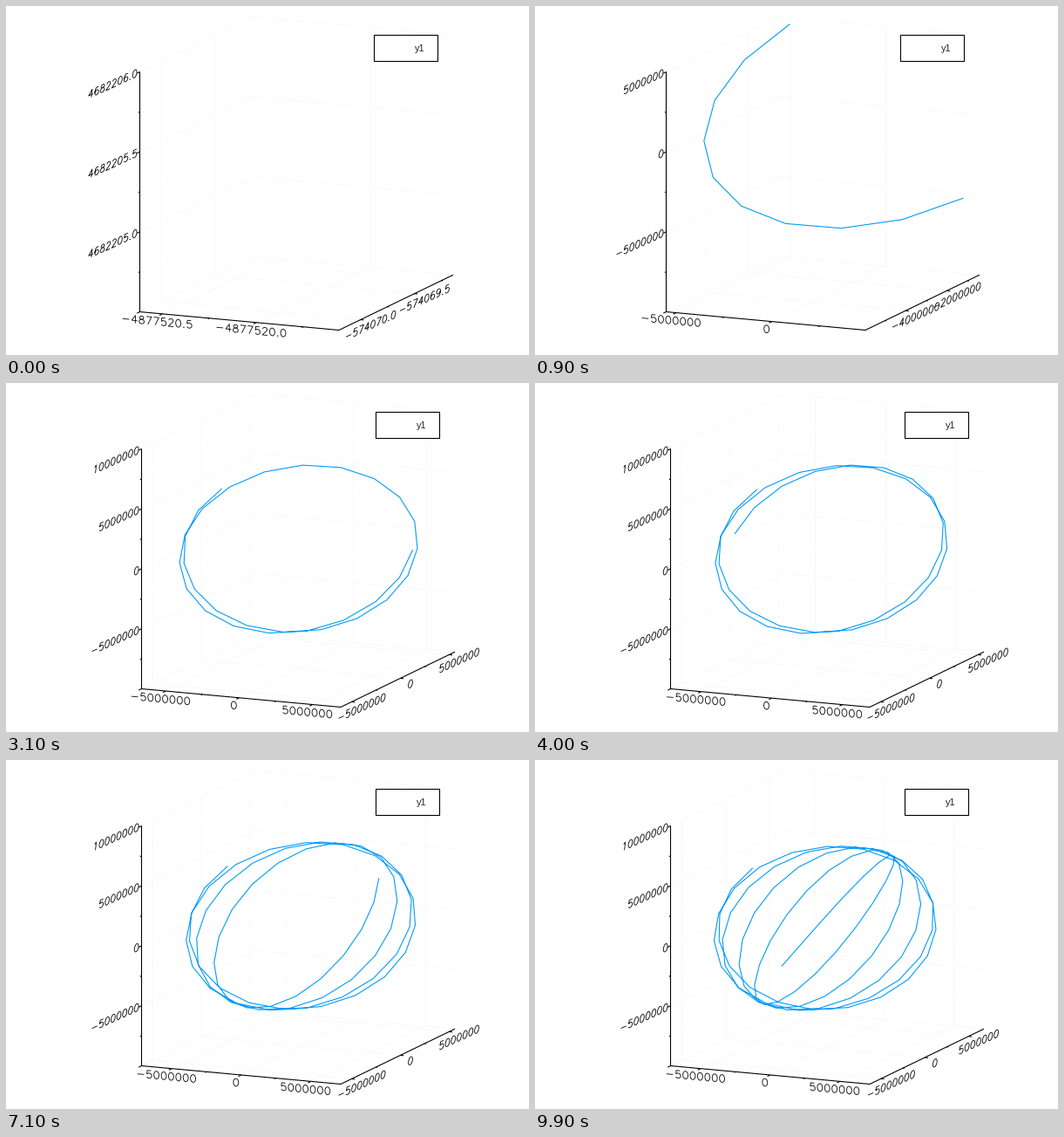
A matplotlib script for the animation above (10 s loop, 600x400 px).

```python
import numpy as np
import matplotlib.pyplot as plt
from matplotlib.animation import FuncAnimation
from matplotlib.collections import LineCollection
from matplotlib.patches import Rectangle

W, H, DPI = 600, 400, 100
FRAMES, INTERVAL = 100, 100
PX = 72 / DPI

# ---- satellite track in the rotating Earth frame, one point per 5 minutes
START = np.array([-4877520.09, -574069.67, 4682205.25])
INCL = np.radians(51.64)
STEP = np.radians(19.376)
DRIFT = np.radians(1.271)


def orbit(count):
    k = np.arange(count)
    r = np.linalg.norm(START)
    arg0 = np.pi - np.arcsin(START[2] / r / np.sin(INCL))
    lon0 = np.arctan2(START[1], START[0])
    node0 = lon0 - np.arctan2(np.cos(INCL) * np.sin(arg0), np.cos(arg0))
    arg, node = arg0 + STEP * k, node0 - DRIFT * k
    a, b = np.cos(arg), np.cos(INCL) * np.sin(arg)
    return r * np.column_stack([
        a * np.cos(node) - b * np.sin(node),
        a * np.sin(node) + b * np.cos(node),
        np.sin(INCL) * np.sin(arg)])


TRACK = orbit(FRAMES)

# ---- projection of the unit cube to the stage
EX, EY, EZ = np.array([[228.5, 21], [131, -63.3], [0, -275]])


def origin(k):
    x = 153.5 if k == 0 else 150.5 if k < 16 else 155.5
    return np.array([x, 350.5])


def project(org, uvw):
    return org + np.asarray(uvw, float) @ np.array([EX, EY, EZ])


def tick_unit(lo, hi):
    e = np.log10(hi - lo)
    n = np.floor(e)
    f = 10 ** (e - n)
    return (2 if f > 5 else 1 if f > 2.5 else 0.5) * 10 ** n


def limits(pts):
    lo, hi = pts.min(axis=0), pts.max(axis=0)
    if len(pts) == 1:
        lo, hi = lo - 0.5, hi + 0.5
    pad = 0.03 * (hi - lo)
    lo, hi = lo - pad, hi + pad
    t = tick_unit(lo[2], hi[2])
    lo[2], hi[2] = t * np.floor(lo[2] / t), t * np.ceil(hi[2] / t)
    return lo, hi


# ---- single-stroke digits, 21 units tall
def arc(cx, cy, rx, ry, a, b, n=13):
    t = np.radians(np.linspace(a, b, n))
    return np.column_stack([cx + rx * np.cos(t), cy + ry * np.sin(t)])


def join(*parts):
    return np.vstack([np.asarray(p, float) for p in parts])


SIX = join([(15.5, 19)], arc(11, 12, 7, 9, 70, 180, 7),
           arc(10.5, 6.5, 6.5, 6.5, 180, 540, 17))
GLYPHS = {
    "0": [arc(10, 10.5, 7, 10.5, 0, 360, 21)],
    "1": [join([(6, 17), (8, 18), (11, 21), (11, 0)])],
    "2": [join(arc(10, 15.5, 6, 5.5, 170, -35, 10), [(3, 0), (17, 0)])],
    "3": [join([(5, 21), (16, 21), (10, 13)], arc(10, 6.5, 7, 6.5, 80, -155))],
    "4": [join([(13, 0), (13, 21), (3, 7), (18, 7)])],
    "5": [join([(15, 21), (5, 21), (4, 12)], arc(10, 7, 7, 7, 130, -150))],
    "6": [SIX],
    "7": [join([(3, 21), (17, 21), (7, 0)])],
    "8": [arc(10, 16.5, 5.5, 4.5, 0, 360, 17), arc(10, 6, 7, 6, 0, 360, 17)],
    "9": [np.array([20, 21]) - SIX],
    "-": [join([(4, 9), (22, 9)])],
    ".": [join([(4.5, 0.5), (5.5, 0.5), (5.5, 1.5), (4.5, 1.5), (4.5, 0.5)])],
}
ADVANCE = {"-": 26, ".": 10}

FLAT = np.array([[0.42, 0.039], [0, -0.42]])
SLOPED = np.array([[0.335, -0.151], [0.05, -0.44]])


def stroke_text(s, pos, basis, align):
    width = sum(ADVANCE.get(c, 20) for c in s)
    pen = -align * width
    out = []
    for c in s:
        out += [pos + (g + [pen, -10.5]) @ basis for g in GLYPHS[c]]
        pen += ADVANCE.get(c, 20)
    return out


# per axis: tick direction, label offset, text basis, alignment
OUT_Y = np.array([-0.9, 0.436])
OUT_X = np.array([0.996, 0.092])
AXES = [
    (OUT_Y, (-6.1, 8.5), FLAT, 0.5),
    (OUT_X, (11.6, 6.3), SLOPED, 0.5),
    (OUT_Y, (-2.5, 0.7), SLOPED, 1.0),
]


def tick_path(axis, f):
    """Cube points: tick foot on the axis, then the grid line over the walls."""
    if axis == 0:
        return (f, 0, 0), [(f, 0, 0), (f, 1, 0), (f, 1, 1)]
    if axis == 1:
        return (1, f, 0), [(1, f, 0), (0, f, 0), (0, f, 1)]
    return (0, 0, f), [(0, 0, f), (0, 1, f), (1, 1, f)]


# ---- stage
fig = plt.figure(figsize=(W / DPI, H / DPI), dpi=DPI, facecolor="white")
ax = fig.add_axes([0, 0, 1, 1])
ax.set(xlim=(0, W), ylim=(H, 0))
ax.axis("off")


def line_layer(color, width, zorder):
    layer = LineCollection([], colors=color, linewidths=width * PX,
                           zorder=zorder)
    ax.add_collection(layer, autolim=False)
    return layer


minor_grid = line_layer("#fefefe", 1, 1)
major_grid = line_layer("#fafafa", 1, 1)
frame_lines = line_layer("black", 1.1, 2)
labels = line_layer("#111111", 0.9, 2)
track, = ax.plot([], [], color="#009afa", lw=1.1 * PX, zorder=3,
                 solid_joinstyle="round")
box = ax.add_patch(Rectangle((0, 32.5), 73, 30, fc="white", ec="black",
                             lw=1.1 * PX, zorder=4))
name = ax.text(0, 52, "y1", family="Liberation Sans", fontsize=11 * PX,
               color="#222222", ha="left", va="baseline", zorder=5)


def draw(k):
    pts = TRACK[:k + 1]
    lo, hi = limits(pts)
    org = origin(k)
    major, minor, text = [], [], []
    lines = [project(org, [(0, 0, 1), (0, 0, 0), (1, 0, 0), (1, 1, 0)])]

    for axis, (out, shift, basis, align) in enumerate(AXES):
        a, b = lo[axis], hi[axis]
        unit = tick_unit(a, b)
        if axis == 2 and k == 0:
            unit = 0.5
        half = unit / 2
        first = int(np.ceil(a / half - 1e-7))
        last = int(np.floor(b / half + 1e-7))
        for n in range(first, last + 1):
            value = n * half
            f = (value - a) / (b - a)
            foot, wall = tick_path(axis, f)
            foot = project(org, foot)
            is_major = n % 2 == 0
            (major if is_major else minor).append(project(org, wall))
            lines.append(np.array([foot, foot + out * (3.6 if is_major else 1.8)]))
            if is_major and f > 1e-6:
                s = f"{value:.1f}" if unit < 1 else f"{value:.0f}"
                text += stroke_text(s, foot + shift, basis, align)

    major_grid.set_segments(major)
    minor_grid.set_segments(minor)
    frame_lines.set_segments(lines)
    labels.set_segments(text)
    xy = project(org, (pts - lo) / (hi - lo))
    track.set_data(xy[:, 0], xy[:, 1])
    track.set_visible(k > 0)
    box.set_x(org[0] + 268)
    name.set_x(org[0] + 315.5)
    return minor_grid, major_grid, frame_lines, labels, track, box, name


anim = FuncAnimation(fig, draw, frames=FRAMES, interval=INTERVAL,
                     init_func=lambda: draw(0), repeat=True, repeat_delay=0)
plt.show()
```
